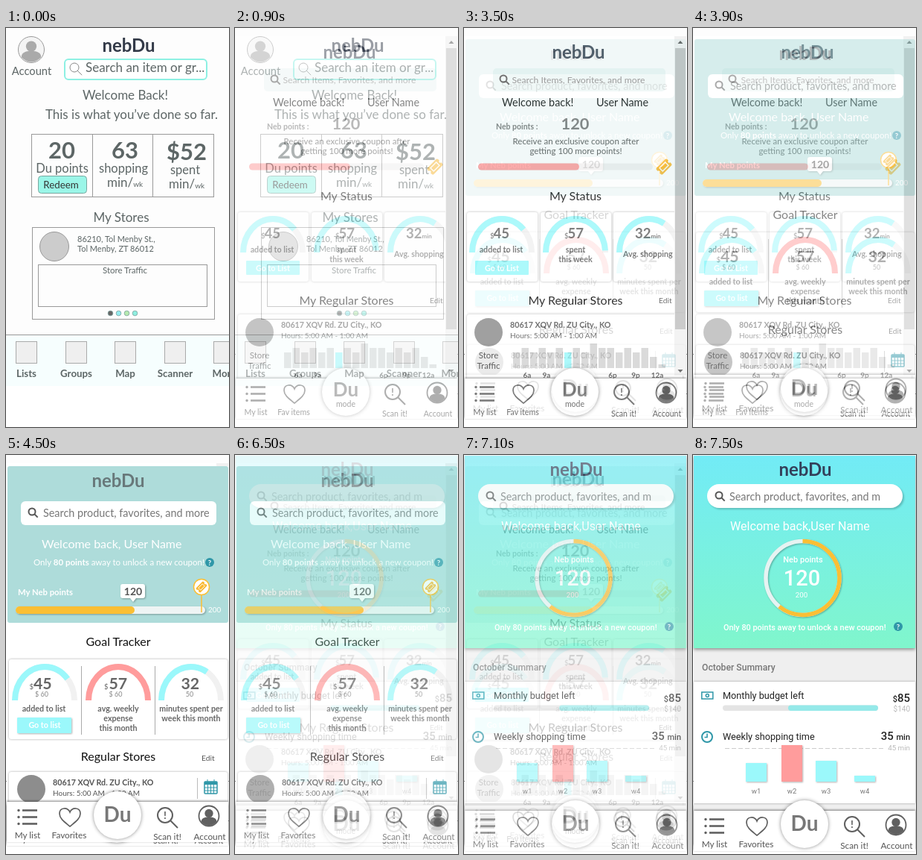
Animation of 300x535 px, one loop 8000 ms. Source, as an HTML page:

```html
<!DOCTYPE html>
<html lang="en">
<head>
<meta charset="utf-8">
<title>Shopping app screens</title>
<style>
  html, body { margin: 0; width: 100%; height: 100%; overflow: hidden; background: #fff; }
  svg { display: block; font-family: Lato, sans-serif; }
  .b { font-weight: 700; }
  .r { font-family: Roboto, sans-serif; }
  .m { font-family: Roboto, sans-serif; font-weight: 500; }
  .glow { filter: drop-shadow(0 0 1.5px rgba(0, 0, 0, .35)); }
  .shadow { filter: drop-shadow(1px 1.5px 1px rgba(0, 0, 0, .3)); }
</style>
</head>
<body>
<svg id="stage" width="300" height="535" viewBox="0 0 300 535"></svg>
<script>
const CYAN = '#9bf8fb', PINK = '#ff9c9c', YELLOW = '#fbbf34', TEAL = '#2f97a8', GREY = '#666';

const text = (x, y, size, str, fill = '#555', extra = '') =>
  `<text x="${x}" y="${y}" font-size="${size}" fill="${fill}" ${extra}>${str}</text>`;
const mid = (x, y, size, str, fill, extra = '') =>
  text(x, y, size, str, fill, `text-anchor="middle" ${extra}`);
const end = (x, y, size, str, fill, extra = '') =>
  text(x, y, size, str, fill, `text-anchor="end" ${extra}`);
const bold = 'class="b"', roboto = 'class="r"', medium = 'class="m"';
const shadow = 'class="shadow"', glow = 'class="glow"';
const rect = (x, y, w, h, fill, extra = '') =>
  `<rect x="${x}" y="${y}" width="${w}" height="${h}" fill="${fill}" ${extra}/>`;
const circle = (x, y, r, fill, extra = '') =>
  `<circle cx="${x}" cy="${y}" r="${r}" fill="${fill}" ${extra}/>`;
const path = (d, stroke, width, extra = '') =>
  `<path d="${d}" fill="none" stroke="${stroke}" stroke-width="${width}" ${extra}/>`;
const outline = (x, y, w, h) => rect(x + .5, y + .5, w, h, 'none', 'stroke="#999"');
const card = (x, y, w, h) => rect(x, y, w, h, '#fff', `rx="3" ${glow}`);
const wordmark = (x, y, fill) => mid(x, y, 24, 'nebDu', fill, bold);

const lens = (x, y, r, color, width) =>
  circle(x, y, r, 'none', `stroke="${color}" stroke-width="${width}"`) +
  path(`M${x + r * .7} ${y + r * .7}l${r} ${r}`, color, width);

const ticket = (x, y, scale) =>
  `<g transform="translate(${x} ${y}) rotate(-45) scale(${scale})">` +
  rect(-10, -6, 20, 12, '#f9b934', 'rx="2"') +
  rect(-5.5, -3, 11, 6, 'none', 'stroke="#fff" stroke-width="1.3"') +
  circle(-10, 0, 1.8, '#fff') + circle(10, 0, 1.8, '#fff') + '</g>';

const help = (x, y) => circle(x, y, 6, TEAL) + mid(x, y + 3.5, 9.5, '?', '#fff', bold);

function gauge(cx, y, portion, color) {
  const d = `M${cx - 40} ${y}A40 45 0 0 1 ${cx + 40} ${y}`;
  return path(d, '#f1f1f1', 8) +
    path(d, color, 8, `pathLength="100" stroke-dasharray="${portion} 200"`);
}

const person = (x, y, r, fill) =>
  circle(x, y - r * .26, r * .42, fill) +
  `<path d="M${x - r * .78} ${y + r * .6}q0 ${-r * .5} ${r * .78} ${-r * .5}t${r * .78} ${r * .5}q${-r * .78} ${r * .75} ${-r * 1.56} 0z" fill="${fill}"/>`;

function nav(y, [list, heart, scan, account], second, mode) {
  const ink = '#606060';
  const rows = [-9, 0, 9].map(d =>
    circle(list - 12, y + 20.5 + d, 1.7, ink) +
    path(`M${list - 7} ${y + 20.5 + d}h20`, ink, 2.6)).join('');
  const labelSize = mode ? 10.6 : 11.8;
  const labelY = y + 49;
  const hub = mode ? 149 : 150;
  return rect(1, y, 298, 54, '#fff', 'style="filter:drop-shadow(0 -1px 1.5px rgba(0,0,0,.5))"') +
    circle(hub, y + 18, 32, '#fff', 'style="filter:drop-shadow(0 0 2.5px rgba(0,0,0,.45))"') +
    mid(hub, y + (mode ? 24 : 27), mode ? 26 : 28, 'Du', '#777', bold) +
    (mode ? mid(hub, y + 38, 10.5, 'mode') : '') +
    rows +
    path(`M${heart} ${y + 33}C${heart - 6} ${y + 28} ${heart - 14} ${y + 23} ${heart - 14} ${y + 16}` +
      `C${heart - 14} ${y + 7} ${heart - 3} ${y + 7} ${heart} ${y + 14}` +
      `C${heart + 3} ${y + 7} ${heart + 14} ${y + 7} ${heart + 14} ${y + 16}` +
      `C${heart + 14} ${y + 23} ${heart + 6} ${y + 28} ${heart} ${y + 33}z`, ink, 1.7) +
    lens(scan - 1, y + 18, 10, ink, 2) + mid(scan - 1, y + 23, 14, '!', ink, bold) +
    circle(account, y + 19, 13.5, '#fff', `stroke="${ink}" stroke-width="1.8"`) +
    person(account, y + 19, 13.5, ink) +
    mid(list, labelY, labelSize, 'My list') + mid(heart - 1, labelY, labelSize, second) +
    mid(scan + 2, labelY + 1.5, labelSize, 'Scan it!') + mid(account + 1, labelY + 2, labelSize, 'Account');
}

function wireframe() {
  const ink = '#5d6666', line = 'stroke="#999"';
  const tabs = [['Lists', 13], ['Groups', 80], ['Map', 146], ['Scanner', 213], ['More', 279]];
  return rect(0, 0, 300, 480, '#fdfdfd') +
    circle(34, 29, 17.5, '#f4f4f4', line) + person(34, 29, 17, '#aaa') +
    mid(34.5, 63, 14.7, 'Account', ink) +
    wordmark(165, 32, '#333a48') +
    rect(79, 42, 191, 27, '#fff', 'rx="5" stroke="#8df0e3" stroke-width="2"') +
    lens(92, 53, 6, '#888', 1) + text(107, 59, 17, 'Search an item or gr...', ink) +
    mid(160.5, 96, 17, 'Welcome Back!', ink) +
    mid(169, 122, 17, 'This is what you’ve done so far.', ink) +
    outline(34, 142, 245, 84) + path('M116.5 142V227M197.5 142V227', '#999', 1) +
    mid(75, 175, 31, '20', ink, bold) + mid(160, 175, 31, '63', ink, bold) + mid(243, 177, 31, '$52', ink, bold) +
    mid(75.5, 194, 16.5, 'Du points', ink) + mid(158, 194, 16.5, 'shopping', ink) + mid(241, 196, 16.5, 'spent', ink) +
    [[136, 213], [219, 215]].map(([x, y]) =>
      text(x, y, 17, 'min/<tspan font-size="10">wk</tspan>', ink)).join('') +
    rect(43.5, 198.5, 65, 23, '#9bf6e8', 'rx="4" stroke="#78a8a0"') + mid(74, 215, 13.3, 'Redeem', '#333') +
    mid(155, 260, 17, 'My Stores', ink) +
    outline(35, 267, 245, 123) + circle(65, 293, 19.5, '#ccc', line) +
    text(96, 287, 11, '86210, Tol Menby St.,', ink) + text(96, 300, 11, 'Tol Menby, ZT 86012', ink) +
    outline(43, 317, 227, 56) + mid(160, 329, 11.5, 'Store Traffic', ink) +
    ['#666', '#94ecf0', '#b5e9af', '#8eeee0'].map((c, i) =>
      circle(140.5 + i * 11, 382.5, 3.3, c, 'stroke="#7aa09b" stroke-width=".8"')).join('') +
    rect(0, 412, 300, 68, '#f6fefe') + path('M0 411.5H300', '#999', 1) +
    tabs.map(([label, x]) => rect(x + .5, 420.5, 28, 29, '#efefef', 'stroke="#aaa"') +
      mid(x + 14.5, 468, 13.3, label, ink, bold)).join('');
}

function statusScreen() {
  const traffic = [21, 27, 21, 27, 21, 27, 21, 27, 21, 33, 27, 27, 21, 27, 21, 27, 15, 5];
  return rect(0, 11, 300, 513, '#fff') + path('M0 437.5H1M299 437.5H300M299 490.5H300', '#888', 1) +
    wordmark(154, 41, '#414958') +
    rect(39, 54, 232, 31, '#eef7f6', 'rx="5"') + lens(53, 68, 4.5, '#555', 2) +
    text(64.5, 74, 12.2, 'Search Items, Favorites, and more', '#888') +
    text(51, 105, 14.4, 'Welcome back!', '#111') + text(178, 105, 14.4, 'User Name', '#111') +
    text(43, 136, 10.5, 'Neb points :', '#777', bold) + text(130.5, 136, 21.8, '120', '#777', bold) +
    mid(150.5, 156, 11.5, 'Receive an exclusive coupon after') +
    mid(150.5, 169, 11.5, 'getting 100 more points!') +
    rect(19, 181.5, 235, 9, '#f1f0f0', 'rx="4.5"') + rect(19, 181.5, 136, 9, PINK, 'rx="4.5"') +
    ticket(269, 186, 1) +
    mid(150, 231, 16, 'My Status', '#111') +
    [4, 103, 201].map(x => card(x, 247, 95, 93)).join('') +
    gauge(51, 301, 75, CYAN) + gauge(150, 301, 98, CYAN) + gauge(249, 301, 66, CYAN) +
    text(35, 282, 9.5, '$', GREY) + text(39.5, 282, 18.6, '45', GREY, bold) +
    text(135, 282, 9.5, '$', GREY) + text(139.5, 282, 18.6, '57', GREY, bold) +
    text(230, 282, 18.6, '32<tspan font-size="8">min</tspan>', GREY, bold) +
    mid(50, 301, 10.7, 'added to list', GREY, bold) +
    mid(150, 301, 10.7, 'spent', GREY, bold) + mid(150, 314, 10.7, 'this week', GREY, bold) +
    text(214, 307, 10.7, 'Avg. shopping', GREY, bold) +
    rect(15, 312, 72, 19, CYAN, 'rx="1"') + mid(51, 325.5, 10.7, 'Go to List', '#fff', bold) +
    mid(150, 371, 16, 'My Regular Stores', '#111') + text(262, 369, 10.3, 'Edit') +
    card(4, 384, 290, 100) + circle(33, 408, 19, '#8d8d8d') +
    mid(33, 443, 11.5, 'Store') + mid(33, 457, 11.5, 'Traffic') +
    text(62, 402, 10.7, '80617 XQV Rd. ZU City., KO', '#555', bold) +
    text(62, 416, 10, 'Hours: 5:00 AM - 1:00 AM') +
    traffic.map((h, i) => rect(66 + i * 11.5, 456 - h, 9.5, h, i === 6 ? CYAN : '#d3d3d3')).join('') +
    [['6a', 85], ['9a', 111], ['6p', 200], ['9p', 231], ['12a', 260]].map(([s, x]) =>
      mid(x, 469, 10, s, '#555', bold)).join('') +
    rect(283, 11, 16, 455, '#f1f1f1') + rect(284, 27, 14, 377, '#c1c1c1') +
    '<path d="M287.5 21l3.5-4 3.5 4zM287.5 458l3.5 4 3.5-4z" fill="#555"/>' +
    nav(470, [28, 80, 213, 272], 'Fav items', true);
}

function trackerScreen() {
  const calendar = rect(267, 438, 17, 16, 'none', `stroke="${TEAL}" stroke-width="1.5" rx="1"`) +
    rect(267, 438, 17, 4, TEAL) +
    path('M271 435v5M280 435v5M267 446h17M267 450h17M271.5 442v12M275.5 442v12M279.5 442v12', TEAL, 1);
  return rect(1, 15, 298, 504, '#fff') +
    rect(2, 15, 297, 210, '#aedcda', 'rx="3"') +
    wordmark(151, 43, '#68787a') +
    rect(20, 62, 263, 32, '#fff', 'rx="6"') + lens(35, 76, 4.5, '#555', 2) +
    text(50, 83, 14.4, 'Search product, favorites, and more', '#777') +
    text(48, 125, 16, 'Welcome back, User Name', '#fff') +
    text(37, 148, 11.5, 'Only <tspan class="b">80 points</tspan> away to unlock a new coupon!', '#fff') +
    help(274, 144) +
    text(16, 188, 11.3, 'My Neb points', '#fff', bold) +
    rect(13, 203, 255, 10, '#eef4f4', `rx="5" ${shadow}`) + rect(13, 203, 160, 10, YELLOW, 'rx="5"') +
    `<path d="M157 173h27q3 0 3 3v13q0 3-3 3h-9l-4 5-4-5h-10q-3 0-3-3v-13q0-3 3-3z" fill="#fff" ${shadow}/>` +
    mid(171, 188, 14, '120', '#555', bold) +
    path('M263 188V211', YELLOW, 1.5) +
    circle(263, 177, 10.5, '#fff', `stroke="${YELLOW}" stroke-width="1.5"`) + ticket(263, 177, .7) +
    text(272, 211, 10, '200', '#fff') +
    mid(151, 256, 16, 'Goal Tracker', '#111') +
    card(4, 274, 294, 107) + path('M101.5 283V375M200.5 283V375', '#aaa', 1) +
    gauge(52, 329, 77, CYAN) + gauge(151, 329, 100, PINK) + gauge(249, 329, 67, CYAN) +
    text(31.5, 314, 9.5, '$', GREY) + text(37, 314, 21.3, '45', GREY, bold) +
    text(132, 314, 9.5, '$', GREY) + text(138.5, 314, 21.3, '57', GREY, bold) +
    text(235.5, 314, 21.3, '32', GREY, bold) +
    mid(48, 323.5, 9, '$ 60', '#888') + mid(147.5, 323.5, 9, '$ 60', '#888') + mid(247, 323.5, 9, '50', '#888') +
    mid(51, 344, 10.7, 'added to list', GREY, bold) +
    ['avg. weekly', 'expense', 'this month'].map((s, i) => mid(151, 344 + i * 13, 10.7, s, GREY, bold)).join('') +
    ['minutes spent per', 'week this month'].map((s, i) => mid(249, 344 + i * 13, 10.7, s, GREY, bold)).join('') +
    rect(15, 352, 73, 21, CYAN, `rx="1" ${shadow}`) + mid(52, 366, 10.7, 'Go to list', '#fff', bold) +
    mid(151, 410, 16, 'Regular Stores', '#111') + text(263, 410, 10.3, 'Edit') +
    card(4, 425, 294, 46) + circle(34, 448, 19, '#8d8d8d') +
    text(63, 443, 10.7, '80617 XQV Rd. ZU City., KO', '#555', bold) +
    text(63, 457, 10, 'Hours: 5:00 AM - 1:00 AM') +
    path('M257.5 433V461', '#bbb', 1) + calendar +
    nav(465, [29, 86, 215, 273], 'Favorites');
}

function summaryScreen() {
  const weeks = [[71, 25, CYAN], [119, 49, PINK], [165, 28, CYAN], [217, 8, CYAN]];
  const ring = (color, extra) =>
    circle(147.5, 165, 49.5, 'none', `stroke="${color}" stroke-width="5.5" ${extra}`);
  return rect(1, 1, 299, 527, '#efefef') +
    '<linearGradient id="sea" x2="0" y2="1"><stop stop-color="#72ebf6"/><stop offset="1" stop-color="#80f6cc"/></linearGradient>' +
    rect(1, 1, 298, 258, 'url(#sea)', 'style="filter:drop-shadow(0 2px 2px rgba(0,0,0,.4))"') +
    wordmark(151, 28, '#33405a') +
    rect(19, 39, 263, 32, '#fff', `rx="16" style="filter:drop-shadow(2px 2px 1px rgba(0,0,0,.2))"`) +
    lens(35, 54, 4.5, '#555', 2) +
    text(49, 61, 14.4, 'Search product, favorites, and m', '#777') +
    text(50, 101, 16.1, 'Welcome back,User Name', '#fff', roboto) +
    ring('#e6f3f2', shadow) +
    ring(YELLOW, 'pathLength="100" stroke-dasharray="61 39" transform="rotate(-90 147.5 165)"') +
    mid(148, 144, 11, 'Neb points', '#fff', medium) +
    mid(146.5, 175, 29, '120', '#fff', medium) + mid(146, 191, 9.8, '200', '#fff', roboto) +
    text(41, 235, 10.9, 'Only 80 points away to unlock a new coupon!', '#fff', medium) + help(276, 230) +
    text(12, 289, 12.2, 'October Summary', '#777', medium) +
    rect(1, 304, 298, 163, '#fff', glow) +
    rect(11.8, 318, 15, 9, 'none', `stroke="${TEAL}" stroke-width="1.5"`) +
    circle(19.3, 322.5, 2, 'none', `stroke="${TEAL}" stroke-width="1.5"`) +
    text(40, 327, 12.7, 'Monthly budget left', '#222', roboto) +
    end(292, 331, 15, '<tspan font-size="11">$</tspan>85', '#222', medium) +
    end(292, 344, 10, '$140', '#bbb', roboto) +
    rect(40, 335.5, 209, 7.5, '#e4e4e4', 'rx="3.7"') + rect(128, 335.5, 121, 7.5, '#95e9e9', 'rx="3.7"') +
    circle(19, 378, 7, '#fff', `stroke="${TEAL}" stroke-width="2"`) + path('M19 373.5V378.5H15.5', TEAL, 1.6) +
    text(40, 382, 12.7, 'Weekly shopping time', '#222', roboto) +
    end(292, 382, 15, '35 <tspan font-size="11">min</tspan>', '#222', medium) +
    path('M43 393.5H258', '#ccc', 1, 'stroke-dasharray="6 3"') +
    end(292, 395.5, 9.8, '45 min', '#bbb', roboto) +
    weeks.map(([x, h, color], i) => rect(x, 438 - h, 28, h, color, shadow) +
      mid(x + 14, 454, 9.5, 'w' + (i + 1), '#777', roboto)).join('') +
    nav(477, [29, 86, 215, 273], 'Favorites');
}

const stage = document.getElementById('stage');
stage.innerHTML = [wireframe, statusScreen, trackerScreen, summaryScreen]
  .map(draw => `<g>${draw()}</g>`).join('');
const [, status, tracker, summary] = stage.children;

// Each fade runs in six steps of 200 ms.
const fade = (time, start) => Math.min(1, Math.max(0, (Math.floor((time - start) / 200) + 1) / 6));
const startTime = performance.now();

function render() {
  const time = (performance.now() - startTime) % 8000;
  const toSummary = fade(time, 6500);
  status.style.opacity = fade(time, 500);
  // The tracker fades out as the summary fades in, letting the status screen show through.
  tracker.style.opacity = fade(time, 3500) * (1 - toSummary);
  summary.style.opacity = toSummary;
  requestAnimationFrame(render);
}
render();
</script>
</body>
</html>
```
